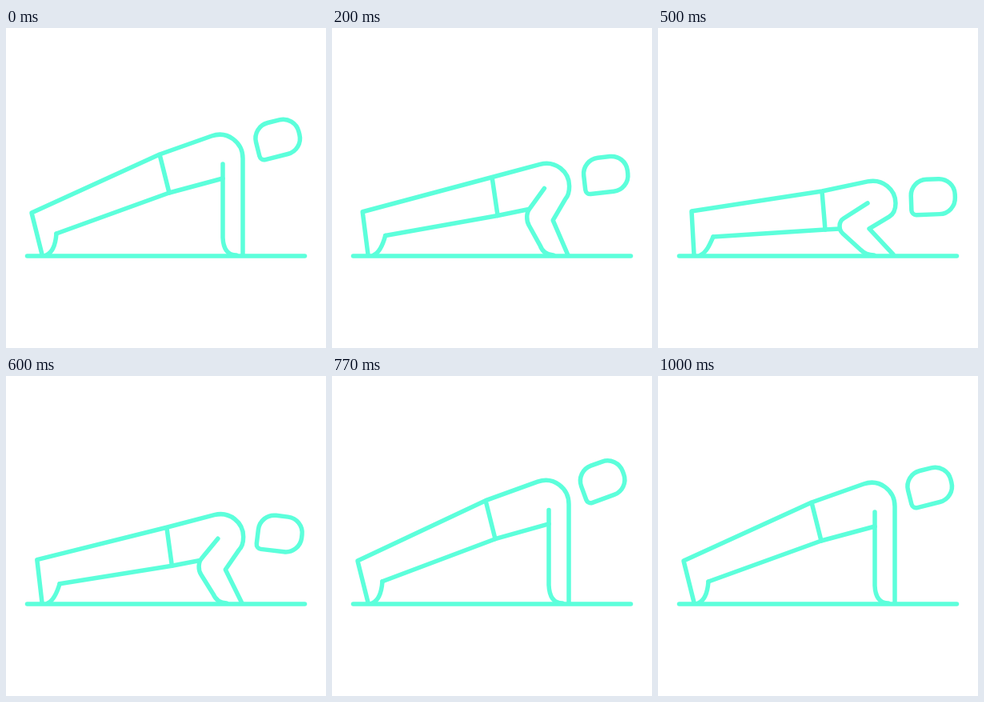
An HTML page that plays this animation: 400 by 400 pixels, repeating every 1.02 s.

```html
<!DOCTYPE html>
<html lang="en">
<head>
<meta charset="utf-8">
<title>Push-up</title>
<style>
  html, body { margin: 0; width: 100%; height: 100%; overflow: hidden; background: #fff; }
  svg { display: block; width: 100%; height: 100%; }
  path { fill: none; stroke: #5cffdb; stroke-width: 5.5; stroke-linecap: round; stroke-linejoin: round; }
</style>
</head>
<body>
<svg viewBox="0 0 400 400">
  <path d="M26.5 285H373.5"/>
  <path id="body"/>
  <path id="belly"/>
  <path id="head" d="M-21.5 22A6 6 0 0 1-27.5 16V-2A20 20 0 0 1-7.5-22H7.5A20 20 0 0 1 27.5-2V2A20 20 0 0 1 7.5 22Z"/>
</svg>
<script>
const LOOP = 1020;
const [body, belly, head] = ['body', 'belly', 'head'].map(id => document.getElementById(id));

// Same structure in both poses: back and outer arm, waist, toes, inner arm.
const HIGH = `M45 283L32 231L192 158L257 135C277 128 296 143 296 163Q296 172 296 178L296 223L296 284
  M192 158L204 206 M63 257C62 270 58 281 50 284
  M271 170L271 207C271 213 271 223 271 230L271 262Q272 284 288 284`;
const LOW = `M45 283L42 229L205 204L262 192C281 188 297 202 297 219Q297 231 289 236L264 251L294 283
  M205 204L209 252 M69 261C65 270 61 280 53 284
  M262 219L232 238C225.5 242 225.5 252 231 257L253 277Q260 284 270 284`;
const lowNumbers = LOW.match(/[\d.]+/g).map(Number);

const mix = (a, b, k) => a + (b - a) * k;
const span = (t, a, b) => Math.min(1, Math.max(0, (t - a) / (b - a)));
const smooth = k => k * k * (3 - 2 * k);

function bezier(x1, y1, x2, y2) {
  const at = (a, b, s) => 3 * (1 - s) ** 2 * s * a + 3 * (1 - s) * s * s * b + s ** 3;
  return x => {
    let lo = 0, hi = 1;
    for (let i = 0; i < 24; i++) {
      const mid = (lo + hi) / 2;
      if (at(x1, x2, mid) < x) lo = mid; else hi = mid;
    }
    return at(y1, y2, (lo + hi) / 2);
  };
}
const sink = bezier(.25, .1, .25, 1);
const push = bezier(.36, .1, .3, 1);

// 0 is arms straight, 1 is lowest; the push slightly overshoots.
function depth(t) {
  if (t < 537) return sink(span(t, 18, 525));
  if (t < 775) return mix(1, -.05, push(span(t, 537, 775)));
  return mix(-.05, 0, smooth(span(t, 775, 1000)));
}

// Extra head tilt in degrees: it lags behind the push, then swings past.
function nod(t) {
  if (t < 600) return 12.7 * smooth(span(t, 537, 600));
  if (t < 775) return mix(12.7, -5.4, smooth(span(t, 600, 775)));
  return mix(-5.4, 0, smooth(span(t, 775, 1000)));
}

function draw(t) {
  const p = depth(t), px = Math.max(p, 0), tilt = nod(t);
  let i = 0;
  body.setAttribute('d', HIGH.replace(/[\d.]+/g, n => {
    const k = i % 2 ? p : px;
    return mix(+n, lowNumbers[i++], k).toFixed(2);
  }));

  // The belly line slides along the upper arm before reaching the elbow.
  const slide = Math.max(0, 1 - Math.abs(px - .34) / .34);
  belly.setAttribute('d', `M${mix(63, 69, px)} ${mix(257, 261, p)}
    L${mix(204, 209, px)} ${mix(206, 252, p)}
    L${mix(271, 227, px) + 6 * slide} ${mix(188, 251, p) - 2 * slide}`);

  const x = mix(339.7, 343.8, p) + Math.min(0, tilt) * .25;
  const y = mix(138, 211, p) + tilt * .75;
  head.setAttribute('transform', `translate(${x} ${y}) rotate(${mix(-14, -2, p) + tilt})`);
}

// Steps of 25 ms, with the odd ones shown 5 ms early.
function tick() {
  const t = performance.now() % LOOP;
  draw(Math.floor(t / 50) * 50 + (t % 50 >= 20 ? 25 : 0));
  requestAnimationFrame(tick);
}
tick();
</script>
</body>
</html>
```
